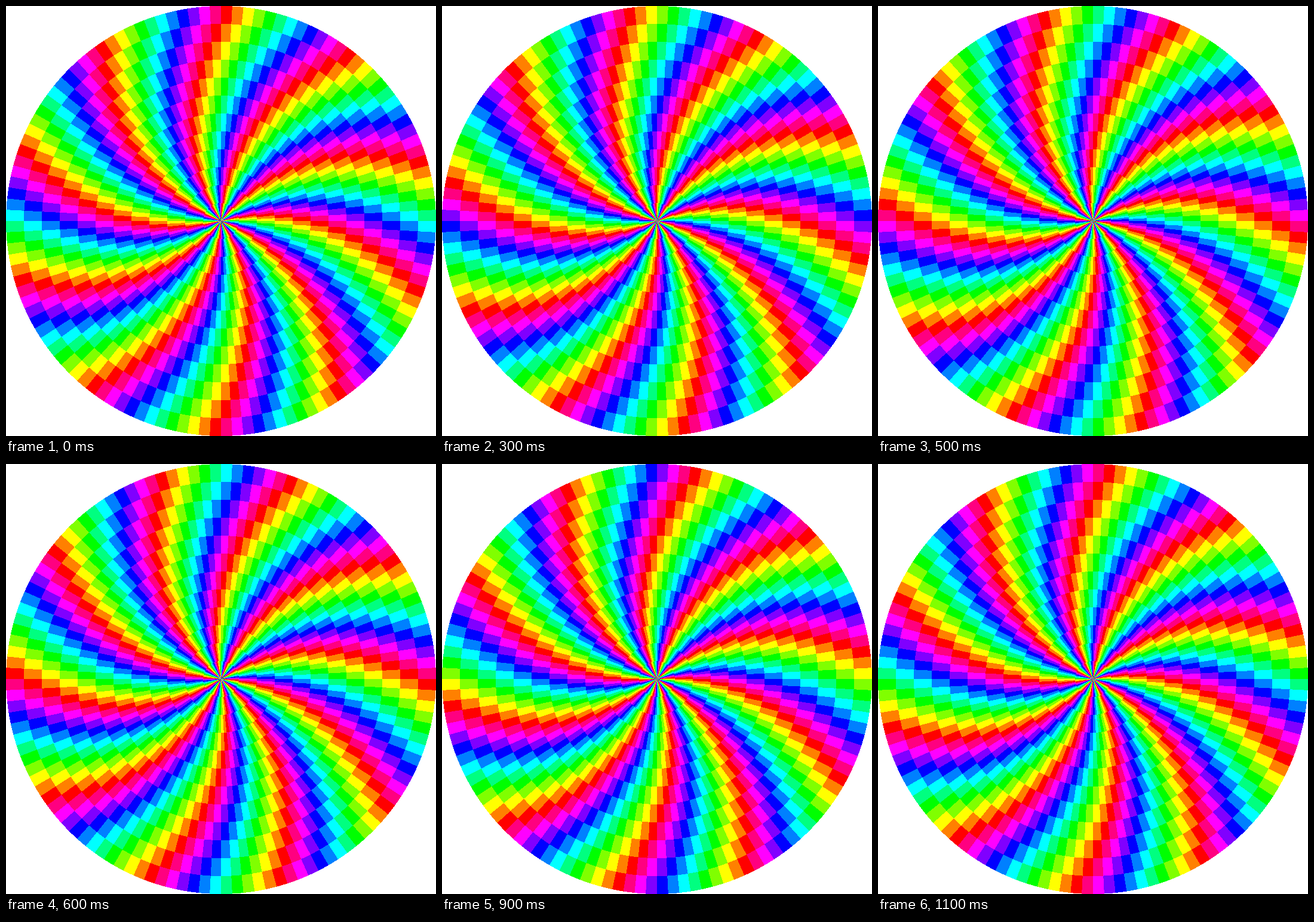
Animation, 720 px wide and 720 px high, one loop 1.2 s. Source, as an HTML page with a canvas:

```html
<!DOCTYPE html>
<html lang="en">
<head>
<meta charset="utf-8">
<title>Rainbow swirl</title>
<style>
  html, body { margin: 0; width: 100%; height: 100%; overflow: hidden; background: #fff; }
  canvas { display: block; }
</style>
</head>
<body>
<canvas id="stage" width="720" height="720"></canvas>
<script>
const SIZE = 720, R = SIZE / 2, RING = 30, SECTORS = 120, HUES = 12, STEP = 100;
const ctx = document.getElementById('stage').getContext('2d');
const image = ctx.createImageData(SIZE, SIZE);
const pixels = new Uint32Array(image.data.buffer);

// Brightness of a channel whose peak sits at `peak` on the 12-hue wheel.
function channel(hue, peak) {
  const d = Math.abs(hue - peak);
  return Math.max(0, Math.min(255, (4 - Math.min(d, HUES - d)) * 128));
}

const palette = Array.from({ length: HUES }, (_, h) =>
  (255 << 24 | channel(h, 8) << 16 | channel(h, 4) << 8 | channel(h, 0)) >>> 0);

// Hue of each pixel at time zero: one step per sector clockwise and per ring inward.
const hues = new Int16Array(SIZE * SIZE).fill(-1);
for (let y = 0, i = 0; y < SIZE; y++) {
  for (let x = 0; x < SIZE; x++, i++) {
    const dx = x + 0.5 - R, dy = y + 0.5 - R, r = Math.hypot(dx, dy);
    if (r >= R) continue;
    const turn = (Math.atan2(dx, -dy) / (2 * Math.PI) + 1) % 1;
    hues[i] = Math.floor(turn * SECTORS) + Math.floor((R - r) / RING);
  }
}

let shown = -1;
function draw(now) {
  const shift = Math.floor(now / STEP) % HUES;
  if (shift !== shown) {
    shown = shift;
    for (let i = 0; i < hues.length; i++) {
      pixels[i] = hues[i] < 0 ? 0xffffffff : palette[(hues[i] + shift) % HUES];
    }
    ctx.putImageData(image, 0, 0);
  }
  requestAnimationFrame(t => draw(Math.max(0, t - start)));
}

const start = performance.now();
draw(0);
</script>
</body>
</html>
```
